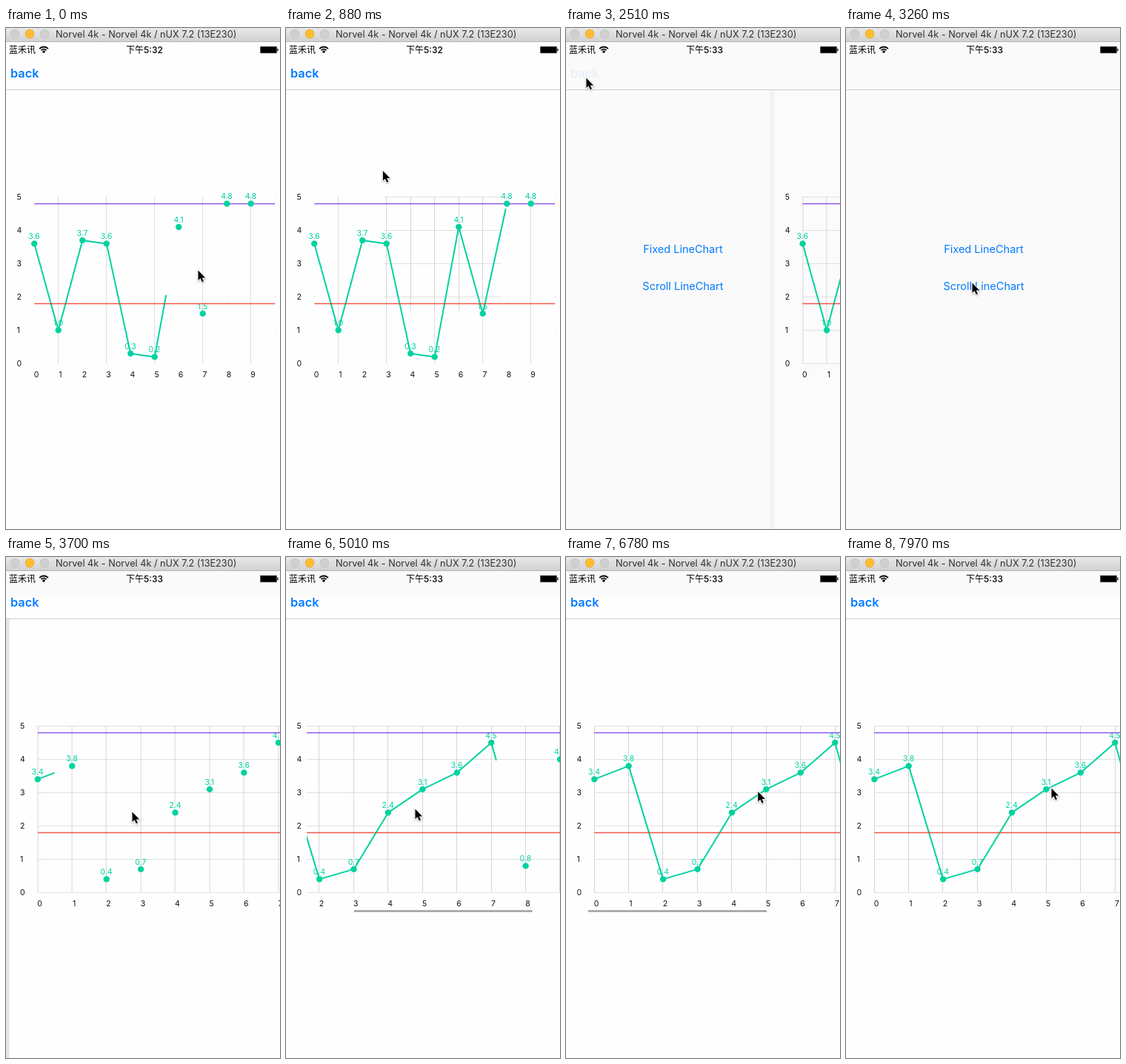
Write an HTML page with a canvas that moves like this. It is 370 px wide and 677 px high and loops after 8000 ms.

```html
<!DOCTYPE html>
<html lang="zh">
<head>
<meta charset="utf-8">
<style>
  html, body { margin: 0; width: 100%; height: 100%; overflow: hidden; background: #fff; }
  canvas { display: block; }
</style>
</head>
<body>
<canvas id="stage" width="370" height="677"></canvas>
<script>
const ctx = document.getElementById('stage').getContext('2d');
const W = 370, H = 677, VIEW = 375, LOOP = 8000, STEP = 147.6;
const FONT = 'Inter, "Noto Sans CJK SC", "Noto Sans CJK", sans-serif';
const GREEN = '#00d2a0', BLUE = '#007aff';
const LEFT = 38, BASE = 453, UNIT = 45, CLIP = 28, DRAW_TIME = 2860;

const fixedChart = { gap: 32.5, start: -1562, values: [3.6, 1, 3.7, 3.6, 0.3, 0.2, 4.1, 1.5, 4.8, 4.8] };
const scrollChart = { gap: 325 / 7, start: 3345, values: [3.4, 3.8, 0.4, 0.7, 2.4, 3.1, 3.6, 4.5, 0.8, 4.0] };
const POP = 2362, PUSH = 3340;

// Keyframes: [time, value, value...]
const cursorKeys = [
  [0, 259, 327], [350, 240, 300], [1180, 86, 149], [1770, 50, 83], [2214, 26, 67], [2560, 27, 67],
  [3100, 170, 344], [3700, 170, 344], [4600, 260, 335], [5018, 174, 340], [5400, 102, 346],
  [5900, 102, 346], [6650, 260, 322], [7080, 255, 300], [7450, 90, 64], [7600, 90, 64], [7960, 277, 312]
];
const scrollKeys = [[4600, 0], [5018, 86], [5400, 145], [5700, 139.3], [5900, 139.3], [6600, 0]];
const barKeys = [[4580, 0], [4720, 0.38], [5650, 0.38], [5756, 0.28], [5900, 0.38], [7050, 0.38], [7350, 0]];

const clamp = v => Math.max(0, Math.min(1, v));
const mix = (a, b, u) => a + (b - a) * u;
const valueY = v => BASE - v * UNIT;

function track(keys, t) {
  if (t <= keys[0][0]) return keys[0].slice(1);
  for (let i = 1; i < keys.length; i++) {
    const a = keys[i - 1], b = keys[i];
    if (t < b[0]) {
      const u = (t - a[0]) / (b[0] - a[0]), e = u * u * (3 - 2 * u);
      return a.slice(1).map((v, k) => mix(v, b[k + 1], e));
    }
  }
  return keys[keys.length - 1].slice(1);
}

function spring(ms) {
  const x = Math.max(0, ms) * 0.0183;
  return 1 - (1 + x) * Math.exp(-x);
}

// cubic-bezier(.42, 0, .58, 1)
function easeInOut(u) {
  let lo = 0, hi = 1, s = 0.5;
  for (let i = 0; i < 20; i++) {
    s = (lo + hi) / 2;
    const x = 1.26 * s * (1 - s) ** 2 + 1.74 * s * s * (1 - s) + s ** 3;
    if (x < u) lo = s; else hi = s;
  }
  return s * s * (3 - 2 * s);
}

function rect(x, y, w, h, color) {
  ctx.fillStyle = color;
  ctx.fillRect(x, y, w, h);
}

function line(x1, y1, x2, y2, color, width = 1) {
  ctx.strokeStyle = color;
  ctx.lineWidth = width;
  ctx.beginPath();
  ctx.moveTo(x1, y1);
  ctx.lineTo(x2, y2);
  ctx.stroke();
}

function circle(x, y, r, color) {
  ctx.fillStyle = color;
  ctx.beginPath();
  ctx.arc(x, y, r, 0, Math.PI * 2);
  ctx.fill();
}

function text(str, x, y, size, color, align = 'left', weight = 400) {
  ctx.font = `${weight} ${size}px ${FONT}`;
  ctx.fillStyle = color;
  ctx.textAlign = align;
  ctx.fillText(str, x, y);
}

function clipped(x, y, w, h, draw) {
  ctx.save();
  ctx.beginPath();
  ctx.rect(x, y, w, h);
  ctx.clip();
  draw();
  ctx.restore();
}

function drawGrid(gap) {
  const right = LEFT + gap * 10;
  for (let v = 0; v <= 5; v++) line(LEFT, valueY(v) + 0.5, right, valueY(v) + 0.5, '#e0e0e0');
  for (let i = 0; i <= 10; i++) {
    const x = Math.floor(LEFT + i * gap) + 0.5;
    line(x, valueY(5), x, BASE, '#d6d6d6');
  }
}

// Alternate columns only, with specks at the other crossings
function drawSparseGrid(gap) {
  for (let i = 0; i <= 10; i++) {
    const x = Math.floor(LEFT + i * gap);
    if (i % 2) line(x + 0.5, valueY(5), x + 0.5, BASE, '#dedede');
    else for (let v = 0; v <= 5; v++) rect(x, valueY(v), 1, 1, '#cccccc');
  }
}

function strokeProgress(points, fraction) {
  const lengths = points.slice(1).map((p, i) => Math.hypot(p[0] - points[i][0], p[1] - points[i][1]));
  let left = fraction * lengths.reduce((a, b) => a + b);
  ctx.beginPath();
  ctx.moveTo(...points[0]);
  for (let i = 0; i < lengths.length && left > 0; i++) {
    const u = Math.min(1, left / lengths[i]), [a, b] = [points[i], points[i + 1]];
    ctx.lineTo(mix(a[0], b[0], u), mix(a[1], b[1], u));
    left -= lengths[i];
  }
  ctx.strokeStyle = GREEN;
  ctx.lineWidth = 2;
  ctx.lineJoin = 'round';
  ctx.stroke();
}

function drawPlot(chart, t) {
  const { gap, values } = chart, right = LEFT + gap * 10;
  const points = values.map((v, i) => [LEFT + i * gap, valueY(v)]);
  values.forEach((v, i) => {
    text(v.toFixed(1), points[i][0], points[i][1] - 6, 10.5, GREEN, 'center');
    text(i, points[i][0] + 3, 472, 10.5, '#111', 'center');
  });
  ctx.save();
  ctx.translate(0.25, 0.4);
  const progress = easeInOut(clamp((t - chart.start) / DRAW_TIME));
  if (progress > 0) strokeProgress(points, progress);
  line(LEFT, valueY(1.8), right, valueY(1.8), 'rgba(240,60,45,.85)', 1.5);
  line(LEFT, valueY(4.8), right, valueY(4.8), 'rgba(125,60,240,.85)', 1.5);
  points.forEach(([x, y]) => circle(x, y, 4.2, GREEN));
  ctx.restore();
}

function drawPage(x, bg, body) {
  ctx.save();
  ctx.translate(x, 0);
  if (x > 0.3) rect(-6, 84, 6, H, 'rgba(0,0,0,.03)');
  rect(0, 84, VIEW, H, bg);
  body();
  ctx.restore();
}

function drawAxis() {
  for (let v = 0; v <= 5; v++) text(v, 14.5, valueY(v) + 4, 10.5, '#111');
}

function drawFixedPage(t) {
  drawPage(VIEW * spring(t - POP), t < 2300 ? '#fefefe' : '#fbfbfb', () => {
    drawAxis();
    if (t < 2300) {
      drawSparseGrid(fixedChart.gap);
      const u = clamp((t - 100) / 1200);
      const from = mix(250, 70, u), to = mix(250, 312, u);
      if (u > 0) clipped(from, 220, to - from, 162, () => drawGrid(fixedChart.gap));
    } else drawGrid(fixedChart.gap);
    drawPlot(fixedChart, t);
  });
}

function drawScrollPage(t) {
  const offset = track(scrollKeys, t)[0], alpha = track(barKeys, t)[0];
  drawPage(VIEW * (1 - spring(t - PUSH)), '#fefefe', () => {
    drawAxis();
    clipped(CLIP, 84, VIEW, H, () => {
      ctx.save();
      ctx.translate(-offset, 0);
      drawGrid(scrollChart.gap);
      drawPlot(scrollChart, t);
      ctx.restore();
    });
    if (alpha > 0) line(30 + offset * 0.717, 478.5, 271 + offset * 0.717, 478.5, `rgba(0,0,0,${alpha})`, 2.5);
  });
}

function drawMenuPage(cover, dim) {
  drawPage(-0.3 * VIEW * cover, '#fafafa', () => {
    text('Fixed LineChart', 186, 303.5, 14.5, BLUE, 'center');
    text('Scroll LineChart', 186, 353.5, 14.5, BLUE, 'center');
  });
  rect(0, 84, W, H, `rgba(0,0,0,${dim})`);
}

function drawTopBars(t) {
  const popped = spring(t - POP), pushed = spring(t - PUSH);
  rect(0, 19, W, 65, t < 2300 ? '#fefefe' : '#fafafa');
  if (t > PUSH + 100) rect(0, 54, W, 30, '#fefefe');
  rect(0, 83, W, 1, '#cfcfcf');

  ctx.globalAlpha = t < PUSH ? clamp(1 - 1.23 * popped) : clamp(pushed * 1.2 - 0.2);
  text('back', 6, 67, 16.3, BLUE, 'left', 600);
  ctx.globalAlpha = 1;

  text('蓝禾讯', 4, 33.5, 12, '#000');
  text(t < 2000 ? '下午5:32' : '下午5:33', 187, 33.5, 12, '#000', 'center', 500);
  ctx.strokeStyle = '#000';
  ctx.lineWidth = 1.8;
  for (const r of [8, 4.8]) {
    ctx.beginPath();
    ctx.arc(51, 33.5, r, -Math.PI * 0.76, -Math.PI * 0.24);
    ctx.stroke();
  }
  circle(51, 32, 1.8, '#000');

  rect(343, 24.7, 23, 9.6, '#888');
  rect(343.7, 25.3, 21.6, 8.4, '#000');
  rect(366.3, 27.8, 1.3, 3.4, '#000');

  const metal = ctx.createLinearGradient(0, 0, 0, 18);
  metal.addColorStop(0, '#e8e8e8');
  metal.addColorStop(1, '#d2d2d2');
  rect(0, 0, W, 18, metal);
  rect(0, 18, W, 1, '#b4b4b4');
  ['#d0d0d0', '#fdbd30', '#d0d0d0'].forEach((color, i) => {
    circle(12 + 20 * i, 8, 6.2, i === 1 ? '#e5a528' : '#c0c0c0');
    circle(12 + 20 * i, 8, 5.6, color);
  });
  text('Norvel 4k - Norvel 4k / nUX 7.2 (13E230)', 67, 13, 12.7, '#303030');
}

function drawCursor(x, y) {
  ctx.save();
  ctx.translate(x, y);
  ctx.shadowColor = 'rgba(0,0,0,.3)';
  ctx.shadowBlur = 2;
  ctx.shadowOffsetY = 1;
  const arrow = new Path2D('M.5 .5V14L3.6 11.2 5.8 16.2 8 15.2 5.8 10.4H10.2Z');
  ctx.strokeStyle = '#fff';
  ctx.lineWidth = 2;
  ctx.stroke(arrow);
  ctx.shadowColor = 'transparent';
  ctx.fillStyle = '#000';
  ctx.fill(arrow);
  ctx.restore();
}

function render(t) {
  rect(0, 0, W, H, '#fefefe');
  const pushed = spring(t - PUSH);
  drawMenuPage(t < PUSH ? 1 - spring(t - POP) : pushed, 0.06 * pushed);
  if (t < 3100) drawFixedPage(t);
  if (t >= PUSH) drawScrollPage(t);
  drawTopBars(t);
  drawCursor(...track(cursorKeys, t));
}

function tick() {
  const t = performance.now() % LOOP;
  render(Math.floor((t + 10) / STEP) * STEP);
  requestAnimationFrame(tick);
}
tick();
</script>
</body>
</html>
```
